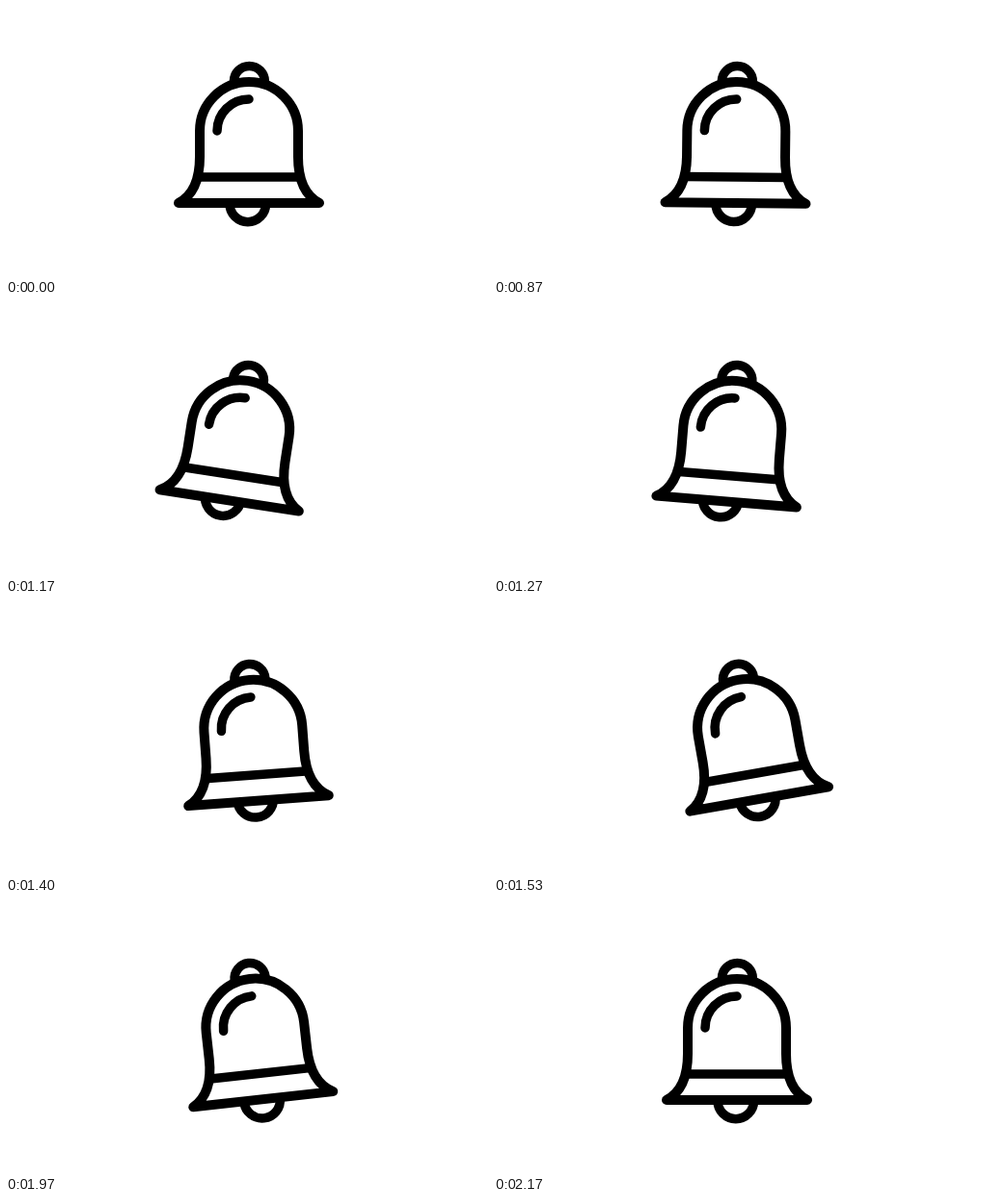
These frames come from a looping animation (500x282 px, 3.01 s). An HTML page with a canvas:

```html
<!DOCTYPE html>
<html lang="en">
<head>
<meta charset="utf-8">
<title>Ringing bell</title>
<style>
  html, body { margin: 0; width: 100%; height: 100%; overflow: hidden; background: #fff; }
  canvas { display: block; width: 500px; height: 282px; }
</style>
</head>
<body>
<canvas id="stage"></canvas>
<script>
const LOOP = 3010, STEP = 100 / 3;
const PIVOT = { x: 252, y: 72 };
const canvas = document.getElementById('stage');
const ctx = canvas.getContext('2d');
const dpr = window.devicePixelRatio || 1;
canvas.width = 500 * dpr;
canvas.height = 282 * dpr;

// Keys: [step, value, slope per step]
const swing = [
  [25, 0, 0], [31.3, 9.6, 0], [38, 4.7, -2.2], [42, -4.3, -2],
  [50, -11.8, 0], [53, -11.1, 0.4], [57, -9, 1.1], [65, 0, 0]
];
const clapX = [[25, 0, 0], [30, -5.5, 0], [38, -5, 0.4], [42, -2, 0.5], [53, 0, 0]];
const clapY = [[25, 0, 0], [30, -1.5, -0.3], [38, -3, 0], [42, -2.5, 0.2], [53, 0, 0]];

function hermite(keys, k) {
  if (k <= keys[0][0]) return keys[0][1];
  for (let i = 1; i < keys.length; i++) {
    const [k0, v0, m0] = keys[i - 1], [k1, v1, m1] = keys[i];
    if (k > k1) continue;
    const d = k1 - k0, u = (k - k0) / d, w = 1 - u;
    return v0 * w * w * (1 + 2 * u) + v1 * u * u * (3 - 2 * u)
      + d * (m0 * u * w * w - m1 * u * u * w);
  }
  return keys[keys.length - 1][1];
}

function line(width, cap, path) {
  ctx.lineWidth = width;
  ctx.lineCap = cap;
  ctx.beginPath();
  path();
  ctx.stroke();
}

function draw(time) {
  const k = Math.floor((time % LOOP + 5) / STEP);
  ctx.setTransform(dpr, 0, 0, dpr, 0, 0);
  ctx.fillStyle = '#fff';
  ctx.fillRect(0, 0, 500, 282);
  ctx.translate(PIVOT.x, PIVOT.y);
  ctx.rotate(hermite(swing, k) * Math.PI / 180);
  ctx.translate(-PIVOT.x, -PIVOT.y);
  ctx.strokeStyle = '#000';
  ctx.lineJoin = 'round';

  // Handle and clapper
  line(9.5, 'butt', () => ctx.arc(252.4, 78.5, 16, Math.PI, 0));
  const cx = 250.8 + hermite(clapX, k), cy = 206 + hermite(clapY, k);
  line(9.5, 'butt', () => ctx.arc(cx, cy, 18.7, 0, Math.PI));

  // Body
  line(10, 'round', () => {
    ctx.moveTo(179, 205);
    ctx.bezierCurveTo(196, 196, 201, 176, 201, 157);
    ctx.lineTo(201, 130);
    ctx.arc(252, 130, 51, Math.PI, 0);
    ctx.lineTo(303, 157);
    ctx.bezierCurveTo(303, 176, 308, 196, 325, 205);
    ctx.closePath();
  });

  // Band and highlight
  line(9.5, 'butt', () => { ctx.moveTo(198, 178); ctx.lineTo(306, 178); });
  line(9.5, 'round', () => ctx.arc(252, 130, 33, Math.PI, Math.PI * 1.5));
}

const start = performance.now();
function tick() {
  draw(performance.now() - start);
  requestAnimationFrame(tick);
}
tick();
</script>
</body>
</html>
```
